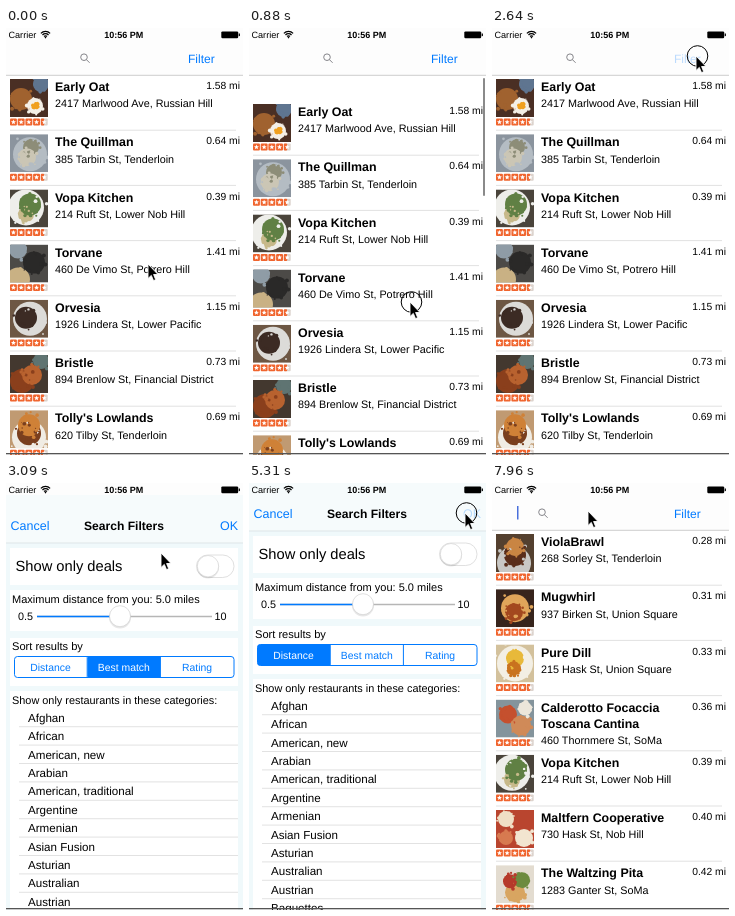
Animation of 237 by 427 pixels, one loop 8 s. Source, as an HTML page:

```html
<!DOCTYPE html>
<html lang="en">
<head>
<meta charset="utf-8">
<title>Restaurant list</title>
<style>
  html, body { margin: 0; width: 100%; height: 100%; overflow: hidden; background: #fff; }
  svg { display: block; }
  #stage { width: 100vw; height: 100vh; font-family: "Liberation Sans", Arial, sans-serif; }
  text { white-space: pre; text-rendering: geometricPrecision; }
</style>
</head>
<body>
<svg id="stage" viewBox="0 0 237 427">
  <defs>
    <filter id="soft"><feGaussianBlur stdDeviation="0.5"/></filter>
    <g id="stars"></g>
  </defs>
  <rect width="237" height="427" fill="#fff"/>
  <g id="listA"></g>
  <g id="listB"></g>
  <rect id="scrollbar" x="234" y="50" width="2" rx="1" fill="#8a8a8a"/>
  <g id="nav"></g>
  <g id="modal"></g>
  <g id="status"></g>
  <rect y="425" width="237" height="1.3" fill="#555"/>
  <g id="pointer">
    <circle id="ring" cx="1.5" cy="0" r="10.3" fill="none" stroke="#000"/>
    <path d="M0 0V14.5L3.3 11.4 5.5 16.6 7.7 15.7 5.6 10.5H10Z" stroke="#fff" stroke-width="0.9"/>
  </g>
</svg>
<script>
const LOOP = 8000, TICK = 147.2, LEAD = 12;
const BLUE = '#007aff', ROW = 55.2;
const $ = id => document.getElementById(id);

const text = (x, y, size, str, extra = '') =>
  `<text x="${x}" y="${y}" font-size="${size}" ${extra}>${str}</text>`;
const rect = (x, y, w, h, fill, extra = '') =>
  `<rect x="${x}" y="${y}" width="${w}" height="${h}" fill="${fill}" ${extra}/>`;
const circle = (x, y, r, fill, extra = '') =>
  `<circle cx="${x}" cy="${y}" r="${r}" fill="${fill}" ${extra}/>`;
const line = (x1, y, x2, color, width = 0.7) =>
  `<path d="M${x1} ${y}H${x2}" stroke="${color}" stroke-width="${width}"/>`;
const BOLD = 'font-weight="bold"', MID = 'text-anchor="middle"', END = 'text-anchor="end"';

function random(seed) {
  return () => (seed = (seed * 16807) % 2147483647) / 2147483647;
}

// A dish: backdrop, then blobs as "color x y radius", each with crumbs of its own color around it.
function photo(y, [backdrop, ...blobs], seed) {
  const rnd = random(seed * 977 + 31);
  let base = '', crumbs = '';
  for (const blob of blobs) {
    const [color, ...numbers] = blob.split(' ');
    const [cx, cy, r] = numbers.map(Number);
    base += circle(cx, cy, r, color);
    for (let i = 0; i < 14; i++) {
      const a = rnd() * 6.283, d = r * (0.5 + rnd() * 0.7);
      crumbs += circle(cx + d * Math.cos(a), cy + d * Math.sin(a), 0.6 + rnd() * 1.4, color);
    }
  }
  return `<svg x="4" y="${y}" width="38" height="38" viewBox="0 0 38 38">` +
    rect(0, 0, 38, 38, backdrop) + `<g filter="url(#soft)">${base}${crumbs}</g></svg>`;
}

function starPath(cx, cy, r) {
  const points = Array.from({ length: 10 }, (_, i) => {
    const a = i * Math.PI / 5 - Math.PI / 2, d = i % 2 ? r * 0.45 : r;
    return `${(cx + d * Math.cos(a)).toFixed(2)},${(cy + d * Math.sin(a)).toFixed(2)}`;
  });
  return `<polygon points="${points}" fill="#fff"/>`;
}

$('stars').innerHTML = [0, 1, 2, 3, 4].map(i => {
  const x = 4 + i * 7.7;
  return rect(x, 0, 6.9, 6.9, i < 4 ? '#f0642d' : '#dcd3cd', 'rx="1"') +
    (i === 4 ? rect(x, 0, 3.4, 6.9, '#f0642d', 'rx="1"') : '') + starPath(x + 3.45, 3.5, 2.6);
}).join('');

const salad = ['#4a443b', '#eeeeea 16 18 18', '#c7b98a 16 25 8', '#608044 20 15 11'];

const byMatch = [
  ['Early Oat', '2417 Marlwood Ave, Russian Hill', '1.58',
    ['#4a2f24', '#5f7590 31 5 8', '#a0622f 11 20 11', '#f4efe6 25 27 8', '#f0a01f 26 27 3']],
  ['The Quillman', '385 Tarbin St, Tenderloin', '0.64',
    ['#8b949e', '#b4bcc3 20 20 17', '#8d8d78 21 13 8', '#cbc6b5 17 23 9']],
  ['Vopa Kitchen', '214 Ruft St, Lower Nob Hill', '0.39', salad],
  ['Torvane', '460 De Vimo St, Potrero Hill', '1.41',
    ['#4c4a47', '#8f9ca6 8 5 9', '#c9b184 8 35 12', '#2a2928 24 18 11']],
  ['Orvesia', '1926 Lindera St, Lower Pacific', '1.15',
    ['#6d5744', '#dcdbd8 20 19 17', '#3c2b24 16 18 11']],
  ['Bristle', '894 Brenlow St, Financial District', '0.73',
    ['#43382f', '#5f7472 31 6 8', '#8a3f1c 12 26 12', '#b8622f 22 20 10']],
  ["Tolly's Lowlands", '620 Tilby St, Tenderloin', '0.69',
    ['#c09a72', '#f0ece4 19 27 17', '#7a3f1e 19 23 12', '#cf8137 19 15 11']]
];

const byDistance = [
  ['ViolaBrawl', '268 Sorley St, Tenderloin', '0.28',
    ['#54402f', '#c9c8c5 18 29 17', '#5a2e1b 19 21 11', '#c98543 19 13 9']],
  ['Mugwhirl', '937 Birken St, Union Square', '0.31',
    ['#37241c', '#e0a55a 19 19 14', '#a3481f 18 23 9']],
  ['Pure Dill', '215 Hask St, Union Square', '0.33',
    ['#d3c19c', '#f3efe4 19 19 18', '#e8b93a 19 14 9', '#c9731f 18 24 7']],
  ['Calderotto Focaccia|Toscana Cantina', '460 Thornmere St, SoMa', '0.36',
    ['#84949c', '#ece6da 29 9 7', '#c5502e 12 15 9', '#d08a58 25 26 10']],
  ['Vopa Kitchen', '214 Ruft St, Lower Nob Hill', '0.39', salad],
  ['Maltfern Cooperative', '730 Hask St, Nob Hill', '0.40',
    ['#b9452f', '#f0dfc5 10 9 8', '#f2e5d0 28 28 9', '#d77a50 10 28 7']],
  ['The Waltzing Pita', '1283 Ganter St, SoMa', '0.42',
    ['#e3dcd0', '#d8a561 19 27 10', '#6d8b3f 26 15 8', '#b63a2b 14 16 7']]
];

function listMarkup(rows) {
  return rows.map(([name, address, miles, dish], i) => {
    const top = i * ROW, lines = name.split('|');
    return photo(top + 51, dish, i + 1) +
      `<use href="#stars" y="${top + 90.6}"/>` +
      lines.map((s, n) => text(49, top + 63.1 + n * 16, 12.4, s, BOLD)).join('') +
      text(49, top + 63.4 + lines.length * 16, 10.8, address) +
      text(234, top + 61.1, 10.3, miles + ' mi', END) +
      line(4, top + 102.2, 230, '#d4d4d4');
  }).join('');
}

$('listA').innerHTML = listMarkup(byMatch);
$('listB').innerHTML = listMarkup(byDistance);

$('nav').innerHTML = rect(0, 0, 237, 47, '#fdfdfd') + line(0, 47.3, 237, '#b8b8b8') +
  '<g id="lens" fill="none" stroke="#85858a"><circle cx="78" cy="29.2" r="3.3"/>' +
  '<path d="M80.4 31.6L83.6 34.8"/></g>' +
  rect(25, 23, 1.5, 13.5, '#4a70dc', 'id="caret"') +
  text(182, 34.7, 12, 'Filter', `id="filter" fill="${BLUE}"`);

const wifi = [2, 4.2, 6.4].map(r => {
  const d = r * 0.72;
  return `<path d="M${39.5 - d} ${10 - d}A${r} ${r} 0 0 1 ${39.5 + d} ${10 - d}" ` +
    'fill="none" stroke="#000" stroke-width="1.3"/>';
}).join('');
$('status').innerHTML = text(2.5, 9.8, 9.1, 'Carrier') + wifi + circle(39.5, 9.6, 0.8, '#000') +
  text(117.7, 9.8, 9, '10:56 PM', BOLD + MID) +
  rect(215.3, 3.4, 16.9, 6.8, '#000', 'rx="1.2"') + rect(232.7, 5.5, 1.2, 2.6, '#000');

const categories = ['Afghan', 'African', 'American, new', 'Arabian', 'American, traditional',
  'Argentine', 'Armenian', 'Asian Fusion', 'Asturian', 'Australian', 'Austrian', 'Baguettes'];
const segments = ['Distance', 'Best match', 'Rating'];

$('modal').innerHTML = rect(0, 0, 237, 427, '#f0f9fb') + rect(0, 0, 237, 48, '#f6fbfc') +
  line(0, 48, 237, '#d5dcde') +
  text(4.5, 35, 12.5, 'Cancel', `fill="${BLUE}"`) +
  text(118, 35, 12.1, 'Search Filters', BOLD + MID) +
  text(232, 35, 12.5, 'OK', `id="ok" ${END} fill="${BLUE}"`) +
  [[53, 37], [95, 41], [143, 48], [196, 231]].map(([y, h]) => rect(4, y, 228, h, '#fff')).join('') +
  text(9.5, 76.3, 14.7, 'Show only deals') +
  rect(190.5, 60, 37.5, 22.5, '#fff', 'rx="11.2" stroke="#e0e0e0"') +
  circle(202, 72.5, 11, '#00000018') + circle(202, 71.2, 10.7, '#fff', 'stroke="#ccc" stroke-width="0.6"') +
  text(6, 107.5, 11, 'Maximum distance from you: 5.0 miles') +
  text(12, 125.3, 10.8, '0.5') + text(208.5, 125.3, 10.8, '10') +
  line(31, 121.5, 206, '#b6b6b6', 1.5) + line(31, 121.5, 114, BLUE, 1.5) +
  circle(114, 122.5, 11, '#00000018') + circle(114, 121.2, 10.5, '#fff', 'stroke="#ccc" stroke-width="0.6"') +
  text(6, 154.7, 11.1, 'Sort results by') +
  segments.map((s, i) => rect(8.5 + i * 73, 161.5, 73, 21, '#fff', 'class="seg" rx="2"') +
    text(44.5 + i * 73.3, 175.7, 10.4, s, MID + ' class="label"')).join('') +
  rect(8.5, 161.5, 219.5, 21, 'none', `rx="3" stroke="${BLUE}"`) +
  `<path d="M81.2 161.5v21M154.4 161.5v21" stroke="${BLUE}"/>` +
  text(6, 208.7, 10.9, 'Show only restaurants in these categories:') +
  categories.map((s, i) => text(22, 226.7 + i * 18.4, 11.6, s) +
    line(13, 231.7 + i * 18.4, 232, '#d6d6d6')).join('');

// Tracks of [tick, ...values], linear in between.
const pointerTrack = [[0, 142, 236], [2, 150, 228], [4, 156, 250], [6, 161, 274], [8, 165, 290],
  [9, 188, 215], [10, 233, 65], [11, 236, 30], [12, 232, 12], [13, 224, 22], [14, 224, 22],
  [16, 204, 28], [18, 204, 28], [20, 180, 48], [22, 130, 92], [26, 50, 175], [30, 50, 175],
  [34, 216, 30], [37, 216, 30], [39, 208, 140], [41, 200, 247], [43, 192, 307], [45, 205, 81],
  [46, 212, 163], [47, 212, 163], [51, 96, 29], [54, 96, 28]];
const pullTrack = [[0, 0], [2, 0], [6, 25], [8, 32], [9, 14], [10, 1], [11, 0]];
const modalTrack = [[0, 427], [18, 427], [19, 300], [20, 90], [21, 12], [22, 0],
  [36, 0], [37, 60], [38, 280], [39, 400], [40, 427]];
const presses = [[2, 8], [17, 18], [28, 28], [36, 36], [53, 53]];

function sample(track, tick) {
  const next = track.findIndex(k => k[0] > tick);
  if (next < 0) return track[track.length - 1].slice(1);
  const a = track[next - 1], b = track[next], p = (tick - a[0]) / (b[0] - a[0]);
  return a.slice(1).map((v, i) => v + (b[i + 1] - v) * p);
}

const show = (id, on) => $(id).setAttribute('visibility', on ? 'visible' : 'hidden');
const move = (id, x, y) => $(id).setAttribute('transform', `translate(${x} ${y})`);
const within = (tick, from, to) => tick >= from && tick <= to;

function render(tick) {
  const [pull] = sample(pullTrack, tick);
  move('listA', 0, pull);
  show('listA', tick < 40);
  show('listB', tick >= 40);
  $('scrollbar').setAttribute('height', 143 - pull);
  show('scrollbar', within(tick, 3, 12));

  move('modal', 0, sample(modalTrack, tick)[0]);
  const chosen = tick < 29 ? 1 : 0;
  document.querySelectorAll('.seg').forEach((el, i) => el.setAttribute('fill', i === chosen ? BLUE : '#fff'));
  document.querySelectorAll('.label').forEach((el, i) => el.setAttribute('fill', i === chosen ? '#fff' : BLUE));

  $('filter').setAttribute('opacity', within(tick, 17, 18) ? 0.25 : 1);
  $('ok').setAttribute('opacity', tick === 36 ? 0.25 : 1);
  move('lens', tick >= 54 ? -28 : 0, 0);
  show('caret', tick >= 54);

  move('pointer', ...sample(pointerTrack, tick));
  show('ring', presses.some(([from, to]) => within(tick, from, to)));
}

let shown = -1;
function frame() {
  const tick = Math.floor((performance.now() % LOOP + LEAD) / TICK);
  if (tick !== shown) render(shown = tick);
  requestAnimationFrame(frame);
}
frame();
</script>
</body>
</html>
```
